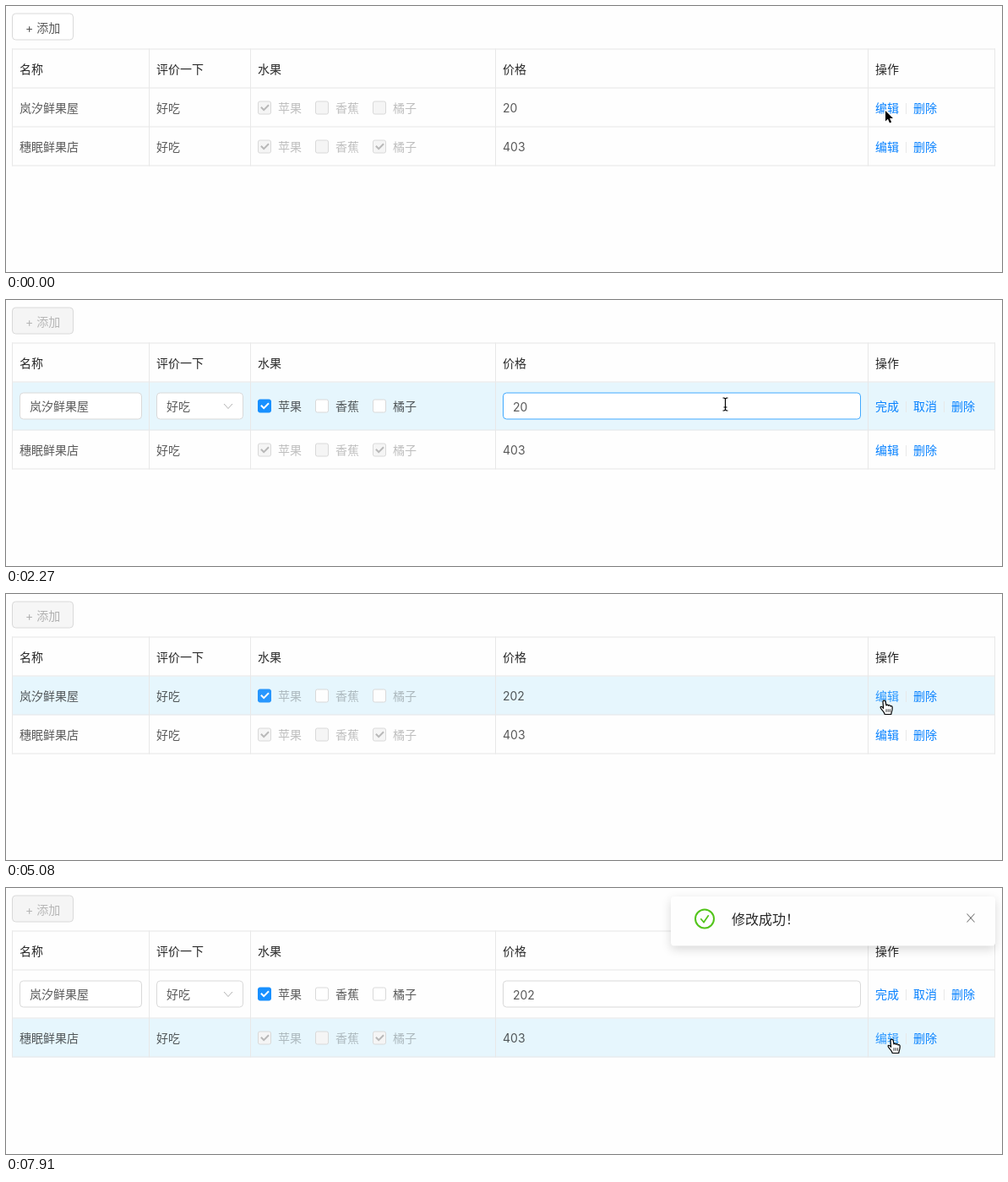
An HTML page with a canvas for the animation above (8000 ms loop, 1179x315 px).

```html
<!DOCTYPE html>
<html lang="zh-CN">
<head>
<meta charset="utf-8">
<title>Editable table</title>
<style>
  html, body { margin: 0; width: 1179px; height: 315px; overflow: hidden; background: #fefefe; }
  canvas { display: block; }
</style>
</head>
<body>
<canvas id="stage" width="1179" height="315"></canvas>
<script>
const ctx = document.getElementById('stage').getContext('2d');
const LOOP = 8000;
const FONT = 'Inter, "Noto Sans CJK SC", "Noto Sans CJK", sans-serif';

// The screen refreshes only at these moments.
const TICKS = [0, 500, 650, 790, 940, 1240, 1530, 1680, 1830, 1970, 2120, 2270, 2410, 2560, 2710,
  3010, 3310, 3600, 3750, 3900, 4040, 4190, 4340, 4480, 4630, 5080, 5230, 5380,
  6720, 6870, 7020, 7320, 7470, 7620, 7760, 7910];

// Pointer path: time, x, y
const PATH = [[0, 1041, 124], [500, 1043, 124], [940, 1043, 124], [1240, 1046, 121], [1680, 1046, 121],
  [2410, 805, 125], [3450, 805, 125], [4040, 990, 131], [4340, 1040, 126], [7170, 1040, 126], [7620, 1049, 179]];

const COLS = [7, 169, 289, 579, 1020, 1170];
const HEADS = ['名称', '评价一下', '水果', '价格', '操作'];
const FRUITS = ['苹果', '香蕉', '橘子'];
const ROWS = [
  { name: '岚汐鲜果屋', picks: [1, 0, 0] },
  { name: '穗眠鲜果店', picks: [1, 0, 1], price: '403' }
];

const WHITE = [255, 255, 255], FAINT = [245, 245, 245], EDGE = [217, 217, 217];
const BLUE = [24, 144, 255], SKY = [64, 169, 255], PAGE = [254, 254, 254], HOVER = [230, 246, 253];
const LINK = [8, 130, 255], LINK_OVER = [40, 150, 255];
const LINE = '#e8e8e8', GREY = '#d9d9d9';
const LIFT = .5; // the page sits half a pixel above the grid

const HAND = new Path2D('M-2 1.7C-2-.4 1-.4 1.2 1.7L2 6C2.5 4.6 4.3 4.8 4.6 6.3C5.2 5.2 6.8 5.6 7 7' +
  'C8 6 9.3 7 9.2 8.6L9 11C8.8 13 8 13.5 7.8 16.5L.2 16.5C0 14.5-1.5 13.5-2.8 11.5' +
  'C-3.8 10-5.5 8.8-4.8 7.6C-4 6.8-2.8 7.8-1.4 9.3Z');
const KNUCKLES = new Path2D('M2 10.3V13.8M4.2 10.3V13.8M6.4 10.3V13.8');
const ARROW = new Path2D('M0 0V12.5L2.9 9.8L5 14.4L7.1 13.4L5.1 9H9Z');
const BEAM = new Path2D('M-3-7.5H-1.5L0-6.5L1.5-7.5H3M0-6.5V6.5M-3 7.5H-1.5L0 6.5L1.5 7.5H3M-2 3.5H2');

const ramp = (t, start, length) => {
  const p = Math.min(1, Math.max(0, (t - start) / length));
  return p * p * (3 - 2 * p);
};
const mix = (a, b, p) => `rgb(${a.map((v, i) => Math.round(v + (b[i] - v) * p))})`;
const ink = alpha => `rgba(0,0,0,${alpha})`;

function text(str, x, y, color = ink(.65), size = 14, weight = 400) {
  ctx.font = `${weight} ${size}px ${FONT}`;
  ctx.fillStyle = color;
  ctx.fillText(str, x, y);
}

function rect(x, y, w, h, color) {
  ctx.fillStyle = color;
  ctx.fillRect(x, y, w, h);
}

function box(x, y, w, h, r, fill, edge) {
  ctx.beginPath();
  ctx.roundRect(x + .5, y + .5 - LIFT, w - 1, h - 1, r);
  ctx.fillStyle = fill;
  ctx.fill();
  ctx.strokeStyle = edge;
  ctx.lineWidth = 1;
  ctx.stroke();
}

function poly(points, color, width) {
  ctx.beginPath();
  points.forEach(([x, y]) => ctx.lineTo(x, y));
  ctx.strokeStyle = color;
  ctx.lineWidth = width;
  ctx.stroke();
}

function pointerAt(t) {
  const i = PATH.findIndex(k => k[0] > t);
  if (i < 0) return PATH[PATH.length - 1].slice(1);
  const [t0, x0, y0] = PATH[i - 1], [t1, x1, y1] = PATH[i];
  const p = (t - t0) / (t1 - t0);
  return [x0 + (x1 - x0) * p, y0 + (y1 - y0) * p];
}

function stateAt(t) {
  const editing = (t >= 1680 && t < 5080) || t >= 6870;
  const leave = ramp(t, 7400, 400);
  const [x, y] = pointerAt(t);
  const s = {
    t, editing, x, y,
    active: ramp(t, 1680, 300) - ramp(t, 5030, 300) + ramp(t, 6870, 150),
    hover: [ramp(t, 420, 330) - leave, leave],
    focus: ramp(t, 2500, 200) - ramp(t, 4400, 220),
    price: t < 3310 ? '20' : '202',
    toast: ramp(t, 5090, 260),
    tops: [98, editing ? 155 : 144, editing ? 201 : 190],
    mids: editing ? [126, 178] : [121, 167],
    shape: 'arrow'
  };
  if (editing && x > 588 && x < 1012 && y > 110 && y < 142) s.shape = 'beam';
  return s;
}

function checkbox(x, mid, checked, active) {
  const y = mid - 8;
  const fill = mix(FAINT, checked ? BLUE : WHITE, active);
  box(x, y, 16, 16, 2, fill, checked ? mix(EDGE, BLUE, active) : GREY);
  if (checked) {
    const tick = [[3.9, 7.2], [7.2, 10.6], [13, 4.8]].map(([dx, dy]) => [x + dx, y + dy - LIFT]);
    poly(tick, mix([184, 184, 184], WHITE, active), 2);
  }
}

function links(s, row) {
  const names = s.editing && row === 0 ? ['完成', '取消', '删除'] : ['编辑', '删除'];
  const mid = s.mids[row];
  names.forEach((name, i) => {
    const x = 1029 + 45 * i;
    const over = s.t >= 500 && s.x >= x && s.x <= x + 28 && Math.abs(s.y - mid) < 12;
    if (over) s.shape = 'hand';
    text(name, x, mid + 5, mix(LINK, LINK_OVER, over ? 1 : 0), 14, 500);
    if (i) rect(x - 9, mid - 6, 1, 13, LINE);
  });
}

function priceInput(s) {
  if (s.focus > 0) {
    ctx.beginPath();
    ctx.roundRect(587, 109 - LIFT, 426, 34, 5);
    ctx.strokeStyle = `rgba(24,144,255,${.25 * s.focus})`;
    ctx.lineWidth = 2;
    ctx.stroke();
  }
  const glow = Math.max(s.focus, s.shape === 'beam' ? 1 : 0);
  box(588, 110, 424, 32, 4, '#fff', mix(EDGE, SKY, glow));
  text(s.price, 600, 132);
  const t = s.t;
  if (t >= 2560 && t < 3010) rect(618, 117, 1, 18, ink(.75));
  if ((t >= 3310 && t < 3900) || t === 4340) rect(627, 117, 1, 18, ink(.75));
}

function drawRow(s, row) {
  const { name, picks, price } = ROWS[row];
  const top = s.tops[row], mid = s.mids[row], base = mid + 5;
  const edit = s.editing && row === 0;
  rect(8, top - LIFT, 1162, s.tops[row + 1] - top, mix(PAGE, HOVER, s.hover[row]));

  if (edit) {
    box(16, 110, 145, 32, 4, '#fff', GREY);
    box(178, 110, 103, 32, 4, '#fff', GREY);
    poly([[258, 123], [263, 128.5], [268, 123]], ink(.3), 1);
    priceInput(s);
  } else {
    text(price || s.price, 588, base);
  }
  const inset = edit ? 12 : 0;
  text(name, 16 + inset, base);
  text('好吃', 178 + inset, base);

  FRUITS.forEach((fruit, i) => {
    const x = 298 + 68 * i;
    checkbox(x, mid, picks[i], row === 0 ? s.active : 0);
    text(fruit, x + 24, base, ink(edit ? .65 : .25));
  });
  links(s, row);
}

function drawTable(s) {
  HEADS.forEach((head, i) => text(head, COLS[i] + 9, 80, ink(.85), 14, 500));
  drawRow(s, 0);
  drawRow(s, 1);
  const bottom = s.tops[2] - 1;
  [51, 97, s.tops[1] - 1, bottom].forEach(y => rect(7, y - LIFT, 1164, 1, LINE));
  COLS.forEach(x => rect(x, 51 - LIFT, 1, bottom - 50, LINE));
}

function drawToast(p) {
  if (p <= 0) return;
  ctx.save();
  ctx.globalAlpha = p;
  ctx.translate(384 * (1 - p), 0);
  ctx.save();
  ctx.shadowColor = ink(.15);
  ctx.shadowBlur = 12;
  ctx.shadowOffsetY = 4;
  ctx.beginPath();
  ctx.roundRect(787, 10, 384, 58.5, 4);
  ctx.fillStyle = '#fefefe';
  ctx.fill();
  ctx.restore();
  ctx.beginPath();
  ctx.arc(827, 36.5, 11, 0, Math.PI * 2);
  ctx.strokeStyle = '#52c41a';
  ctx.lineWidth = 2;
  ctx.stroke();
  poly([[822.3, 36.3], [826, 40.6], [831.7, 32.3]], '#52c41a', 1.7);
  text('修改成功！', 859, 43, ink(.85), 16);
  poly([[1137.5, 30.5], [1146.5, 40.5]], ink(.5), 1.1);
  poly([[1146.5, 30.5], [1137.5, 40.5]], ink(.5), 1.1);
  ctx.restore();
}

function drawPointer(s) {
  ctx.save();
  ctx.translate(Math.round(s.x), Math.round(s.y));
  ctx.lineJoin = 'round';
  if (s.shape === 'beam') {
    ctx.translate(.5, -.5);
    ctx.strokeStyle = '#000';
    ctx.lineWidth = 1.2;
    ctx.stroke(BEAM);
  } else if (s.shape === 'hand') {
    ctx.fillStyle = '#fff';
    ctx.fill(HAND);
    ctx.strokeStyle = '#000';
    ctx.lineWidth = 1.2;
    ctx.stroke(HAND);
    ctx.lineWidth = .8;
    ctx.stroke(KNUCKLES);
  } else {
    ctx.strokeStyle = '#fff';
    ctx.lineWidth = 2.6;
    ctx.stroke(ARROW);
    ctx.fillStyle = '#000';
    ctx.fill(ARROW);
  }
  ctx.restore();
}

function draw(now) {
  const time = now % LOOP;
  const s = stateAt(TICKS.filter(k => k <= time).pop());
  rect(0, 0, 1179, 315, '#fefefe');
  box(7, 9, 73, 32, 4, mix(WHITE, FAINT, s.active), GREY);
  text('+ 添加', 23, 31, ink(.65 - .4 * s.active));
  drawTable(s);
  drawToast(s.toast);
  drawPointer(s);
}

let start;
function loop(now) {
  if (start === undefined) start = now;
  draw(Math.max(0, now - start));
  requestAnimationFrame(loop);
}
requestAnimationFrame(loop);
</script>
</body>
</html>
```
